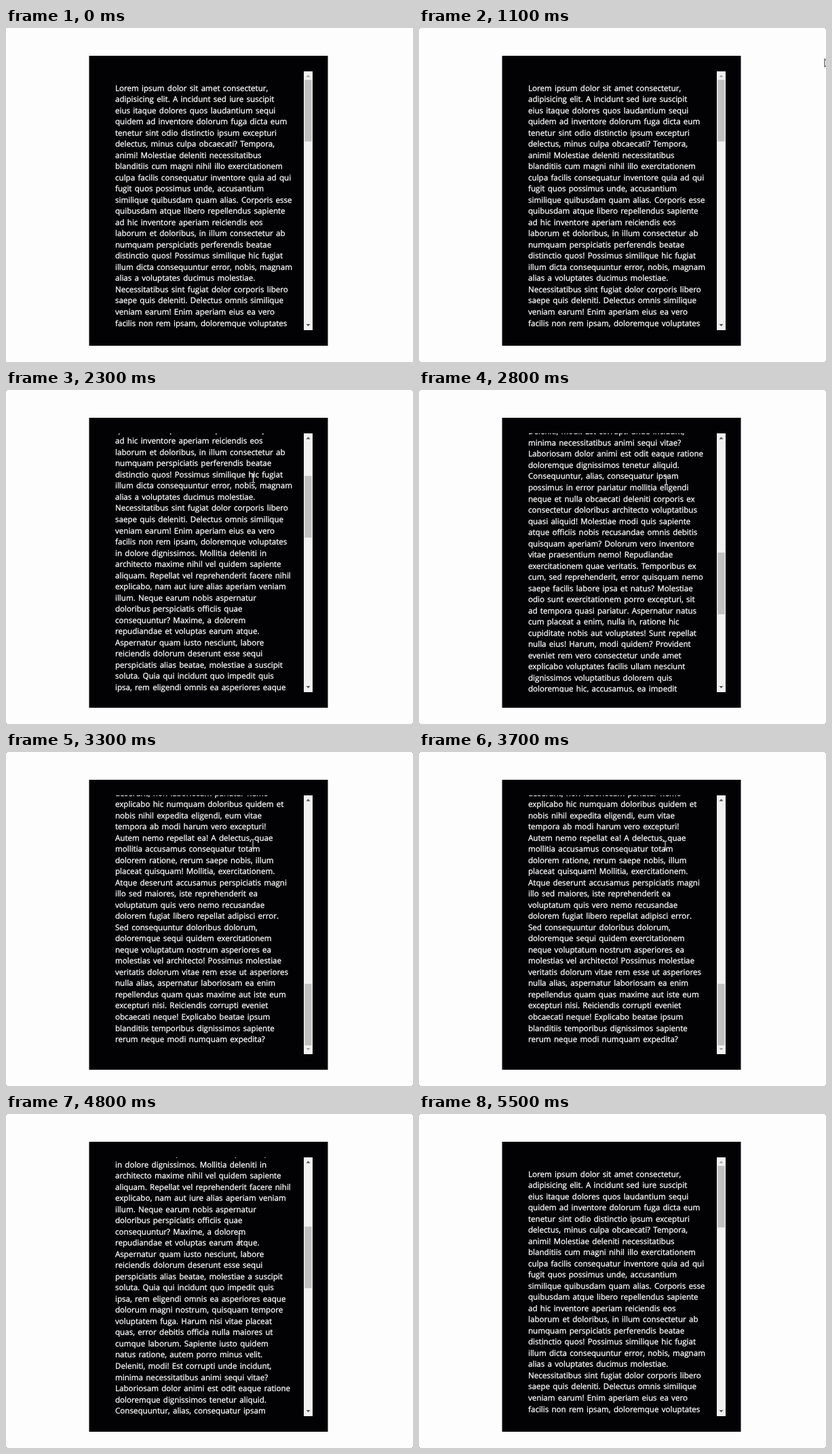
These frames come from a looping animation (600x493 px, 6100 ms). An HTML page:

```html
<!DOCTYPE html>
<html lang="la">
<head>
<meta charset="utf-8">
<title>Scrolling text</title>
<style>
  html, body { margin: 0; width: 100%; height: 100%; overflow: hidden; background: #fefdfe; }
  svg { display: block; width: 100%; height: 100%; }
  text {
    font: 11.6px "Open Sans", "Noto Sans", sans-serif;
    word-spacing: 1.25px;
    fill: #fff;
    stroke: #fff;
    stroke-width: .3px;
    text-rendering: geometricPrecision;
  }
</style>
</head>
<body>
<svg viewBox="0 0 600 493">
  <clipPath id="view"><rect x="150" y="64" width="289" height="382"/></clipPath>
  <rect width="600" height="493" fill="#fefdfe"/>
  <path id="corners" fill="#a5a5a7" d="M0 0h2l-2 2zM600 0v2l-2-2zM0 493v-2l2 2zM600 493h-2l2-2z"/>
  <rect x="122.5" y="41" width="352" height="428" fill="#020103"/>
  <g clip-path="url(#view)"><g id="copy"></g></g>
  <rect x="439" y="64" width="13" height="382" fill="#f1f1f1"/>
  <rect id="thumb" x="440.3" width="10.4" height="91" fill="#c1c1c1"/>
  <path id="up" d="M442.5 72.5l3-3.2 3 3.2z"/>
  <path id="down" d="M442.5 437l3 3.2 3-3.2z"/>
  <path id="arrow" fill="#fff" stroke="#111" stroke-width=".9" d="M.5 .5v12l2.7-2.6 1.8 4.1 1.8-.8-1.8-4h3.9z"/>
  <path id="beam" fill="none" stroke="#eee" d="M-2.5-6.5h2l.5.5.5-.5h2M0-6v12M-2.5 6.5h2l.5-.5.5.5h2"/>
</svg>
<script>
const LOOP = 6100, STEP = 100, LAST = 5500;
const LINE = 16.52, MAX_SCROLL = 1118.3;

const lines = `Lorem ipsum dolor sit amet consectetur,
adipisicing elit. A incidunt sed iure suscipit
eius itaque dolores quos laudantium sequi
quidem ad inventore dolorum fuga dicta eum
tenetur sint odio distinctio ipsum excepturi
delectus, minus culpa obcaecati? Tempora,
animi! Molestiae deleniti necessitatibus
blanditiis cum magni nihil illo exercitationem
culpa facilis consequatur inventore quia ad qui
fugit quos possimus unde, accusantium
similique quibusdam quam alias. Corporis esse
quibusdam atque libero repellendus sapiente
ad hic inventore aperiam reiciendis eos
laborum et doloribus, in illum consectetur ab
numquam perspiciatis perferendis beatae
distinctio quos! Possimus similique hic fugiat
illum dicta consequuntur error, nobis, magnam
alias a voluptates ducimus molestiae.
Necessitatibus sint fugiat dolor corporis libero
saepe quis deleniti. Delectus omnis similique
veniam earum! Enim aperiam eius ea vero
facilis non rem ipsam, doloremque voluptates
in dolore dignissimos. Mollitia deleniti in
architecto maxime nihil vel quidem sapiente
aliquam. Repellat vel reprehenderit facere nihil
explicabo, nam aut iure alias aperiam veniam
illum. Neque earum nobis aspernatur
doloribus perspiciatis officiis quae
consequuntur? Maxime, a dolorem
repudiandae et voluptas earum atque.
Aspernatur quam iusto nesciunt, labore
reiciendis dolorum deserunt esse sequi
perspiciatis alias beatae, molestiae a suscipit
soluta. Quia qui incidunt quo impedit quis
ipsa, rem eligendi omnis ea asperiores eaque
dolorum magni nostrum, quisquam tempore
voluptatem fuga. Harum nisi vitae placeat
quas, error debitis officia nulla maiores ut
cumque laborum. Sapiente iusto quidem
natus ratione, autem porro minus velit.
Deleniti, modi! Est corrupti unde incidunt,
minima necessitatibus animi sequi vitae?
Laboriosam dolor animi est odit eaque ratione
doloremque dignissimos tenetur aliquid.
Consequuntur, alias, consequatur ipsam
possimus in error pariatur mollitia eligendi
neque et nulla obcaecati deleniti corporis ex
consectetur doloribus architecto voluptatibus
quasi aliquid! Molestiae modi quis sapiente
atque officiis nobis recusandae omnis debitis
quisquam aperiam? Dolorum vero inventore
vitae praesentium nemo! Repudiandae
exercitationem quae veritatis. Temporibus ex
cum, sed reprehenderit, error quisquam nemo
saepe facilis labore ipsa et natus? Molestiae
odio sunt exercitationem porro excepturi, sit
ad tempora quasi pariatur. Aspernatur natus
cum placeat a enim, nulla in, ratione hic
cupiditate nobis aut voluptates! Sunt repellat
nulla eius! Harum, modi quidem? Provident
eveniet rem vero consectetur unde amet
explicabo voluptates facilis ullam nesciunt
dignissimos voluptatibus dolorem quis
doloremque hic, accusamus, ea impedit
tempore blanditiis adipisci delectus doloribus
neque. Corporis culpa sit, voluptatum
deserunt, non laboriosam pariatur nemo
explicabo hic numquam doloribus quidem et
nobis nihil expedita eligendi, eum vitae
tempora ab modi harum vero excepturi!
Autem nemo repellat ea! A delectus, quae
mollitia accusamus consequatur totam
dolorem ratione, rerum saepe nobis, illum
placeat quisquam! Mollitia, exercitationem.
Atque deserunt accusamus perspiciatis magni
illo sed maiores, iste reprehenderit ea
voluptatum quis vero nemo recusandae
dolorem fugiat libero repellat adipisci error.
Sed consequuntur doloribus dolorum,
doloremque sequi quidem exercitationem
neque voluptatum nostrum asperiores ea
molestias vel architecto! Possimus molestiae
veritatis dolorum vitae rem esse ut asperiores
nulla alias, aspernatur laboriosam ea enim
repellendus quam quas maxime aut iste eum
excepturi nisi. Reiciendis corrupti eveniet
obcaecati neque! Explicabo beatae ipsum
blanditiis temporibus dignissimos sapiente
rerum neque modi numquam expedita?`.split("\n");

// Keys are [time, value].
const scrollKeys = [[1800, 0], [2300, 211.5], [2800, 688], [3300, MAX_SCROLL],
  [4000, MAX_SCROLL], [4400, 884], [5200, 8], [5400, 0]];
const xKeys = [[1000, 670], [1100, 597.5], [1400, 435], [1700, 370.5], [2300, 364.5],
  [2800, 364.5], [3700, 363], [4400, 345], [5400, 343]];
const yKeys = [[1000, 10], [1100, 45], [1400, 134], [1700, 159], [2300, 130],
  [2800, 133.5], [3700, 138], [4400, 180.5], [5400, 184]];

const $ = id => document.getElementById(id);
const show = (el, on) => el.setAttribute("visibility", on ? "visible" : "hidden");
const move = (el, x, y) => el.setAttribute("transform", `translate(${x} ${y})`);

// Monotone cubic interpolation through the keys.
function curve(keys, t) {
  const end = keys.length - 1;
  if (t <= keys[0][0]) return keys[0][1];
  if (t >= keys[end][0]) return keys[end][1];
  const slope = i => (keys[i + 1][1] - keys[i][1]) / (keys[i + 1][0] - keys[i][0]);
  const tangent = i => {
    if (i === 0 || i === end) return 0;
    const a = slope(i - 1), b = slope(i);
    return a * b <= 0 ? 0 : 2 * a * b / (a + b);
  };
  const i = keys.findIndex(k => k[0] > t) - 1;
  const [t0, v0] = keys[i], [t1, v1] = keys[i + 1];
  const h = t1 - t0, u = (t - t0) / h, w = 1 - u;
  return v0 * (1 + 2 * u) * w * w + v1 * u * u * (3 - 2 * u)
    + h * u * w * (tangent(i) * w - tangent(i + 1) * u);
}

lines.forEach((line, i) => {
  const el = document.createElementNS($("copy").namespaceURI, "text");
  el.setAttribute("x", 161);
  el.setAttribute("y", 92.6 + i * LINE);
  el.textContent = line;
  $("copy").append(el);
});

function draw(ms) {
  const t = Math.min(Math.floor(ms / STEP) * STEP, LAST);
  const scroll = curve(scrollKeys, t);
  move($("copy"), 0, -scroll);
  $("thumb").setAttribute("y", 76.5 + 265.7 * scroll / MAX_SCROLL);
  $("up").setAttribute("fill", scroll > 0.5 ? "#505050" : "#a3a3a3");
  $("down").setAttribute("fill", scroll < MAX_SCROLL - 0.5 ? "#505050" : "#a3a3a3");
  show($("corners"), t >= 100);

  const x = curve(xKeys, t), y = curve(yKeys, t);
  const overText = x < 425 && y > 76;
  show($("arrow"), t < LAST && !overText);
  show($("beam"), t < LAST && overText);
  move($("arrow"), x, y);
  move($("beam"), x, y);
}

function tick() {
  draw(performance.now() % LOOP);
  requestAnimationFrame(tick);
}
tick();
</script>
</body>
</html>
```
